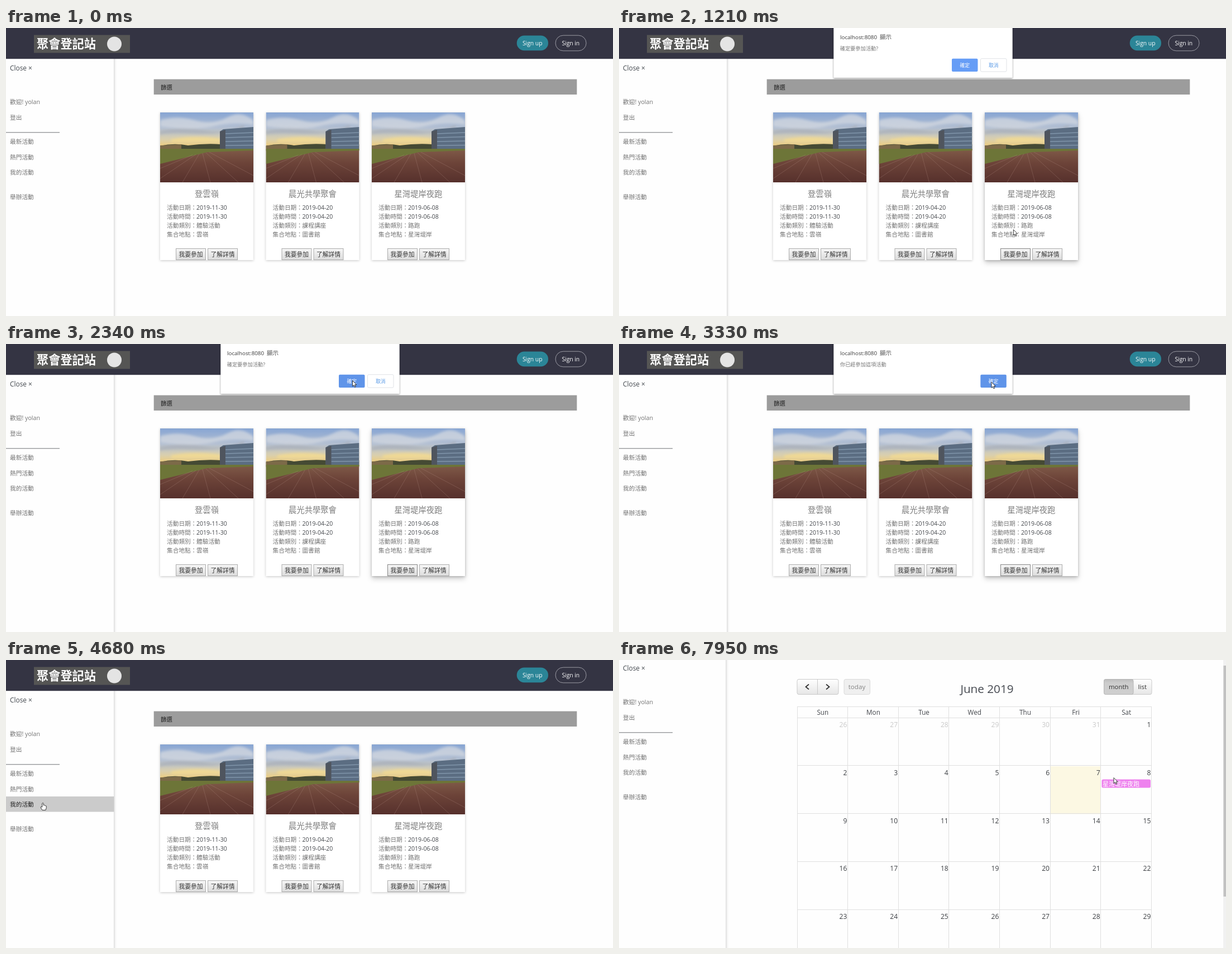
Recreate the animation shown at these times as an HTML page. Size 1087 by 515 pixels, loop 8 s.

```html
<!DOCTYPE html>
<html lang="zh-Hant">
<head>
<meta charset="utf-8">
<title>聚會登記站</title>
<style>
html, body { margin: 0; width: 100%; height: 100%; overflow: hidden; background: #fefefe; }
svg { display: block; width: 1087px; height: 515px; }
text { font-family: "Open Sans", "Noto Sans CJK TC", "Noto Sans CJK JP", "Noto Sans CJK", sans-serif; white-space: pre; }
.soft { filter: drop-shadow(0 1.5px 2px rgba(0,0,0,.22)); }
.deep { filter: drop-shadow(0 5px 5px rgba(0,0,0,.18)); }
.side { filter: drop-shadow(1px 1px 2px rgba(0,0,0,.2)); }
.pop { filter: drop-shadow(0 1px 1.5px rgba(0,0,0,.45)); }
</style>
</head>
<body>
<svg id="stage" viewBox="0 0 1087 515" xmlns="http://www.w3.org/2000/svg"></svg>
<script>
const LOOP = 8000, CALENDAR_AT = 6610, MENU_AT = 6660;

const rect = (x, y, w, h, fill, more = '') =>
  `<rect x="${x}" y="${y}" width="${w}" height="${h}" fill="${fill}" ${more}/>`;
const text = (x, y, s, size, fill, anchor = 'start', more = '') =>
  `<text x="${x}" y="${y}" font-size="${size}" fill="${fill}" text-anchor="${anchor}" ${more}>${s}</text>`;
const path = (d, fill, more = '') => `<path d="${d}" fill="${fill}" ${more}/>`;
const range = n => [...Array(n).keys()];
const gradient = (id, stops) =>
  `<linearGradient id="${id}" x2="0" y2="1">` +
  stops.map(([at, c]) => `<stop offset="${at}" stop-color="${c}"/>`).join('') + '</linearGradient>';

function photo() {
  const lanes = range(6).map(i => `M${88 - i * 6} ${71 + i}L${190 - i * 50} 125`).join('');
  const floors = range(4).map(i => `M117 ${38 + i * 7}L167 ${36 + i * 7.5}`).join('');
  return '<symbol id="photo" viewBox="0 0 167 125" width="167" height="125">' +
    rect(0, 0, 167, 70, 'url(#sky)') +
    '<g filter="url(#blur)" opacity=".75">' +
    path('M0 14Q30 5 62 14T120 9T167 15V22Q130 17 95 25T0 25Z', '#d3d8e0') +
    path('M0 33Q40 25 80 32T150 22V28Q110 40 60 38T0 40Z', '#a9afb9') +
    path('M20 48Q60 40 108 47V53H20Z', '#f6dc8e') + '</g>' +
    path('M0 60Q24 54 50 59Q80 55 110 57H167V68H0Z', '#454a34') +
    path('M0 59L38 57V65H0Z', '#7c6a48') +
    path('M107 34L113 30L167 26V67L107 65Z', '#5b6d82') +
    path(floors, 'none', 'stroke="#8095aa" stroke-width="1.6"') +
    path('M107 34L117 31V65H107Z', '#4f555e') +
    rect(0, 66, 167, 59, 'url(#track)') +
    path('M0 65H167V68L84 71L0 92Z', '#6d7538') +
    path(lanes, 'none', 'stroke="#b89488" stroke-width=".7" opacity=".4"') + '</symbol>';
}

function button(x, y, w, h, label) {
  return rect(x + .5, y + .5, w - 1, h - 1, 'url(#key)', 'stroke="#ababab"') +
    text(x + w / 2, y + 15, label, 10.8, '#333', 'middle');
}

function card(x, name, date, kind, place) {
  const rows = [['活動日期：', date], ['活動時間：', date], ['活動類別：', kind], ['集合地點：', place]];
  return rect(x, 151, 167, 264, '#fff', 'class="soft"') +
    `<use href="#photo" x="${x}" y="151"/>` +
    text(x + 83.5, 302, name, 14.3, '#7d7d7d', 'middle') +
    rows.map(([k, v], i) => text(x + 12, 325 + i * 16.1, k, 10.7, '#747474') +
      text(x + 65, 325 + i * 16.1, v, i < 2 ? 10.5 : 10.7, i < 2 ? '#45484d' : '#747474')).join('') +
    button(x + 28, 394, 54, 21, '我要參加') + button(x + 85, 394, 54, 21, '了解詳情');
}

function home() {
  return rect(264.7, 91.6, 757.6, 27.4, '#9c9c9c') + text(277, 109.5, '篩選', 10.4, '#222') +
    rect(655, 151, 167, 264, '#fff', 'class="deep" id="lift"') +
    card(276, '登雲嶺', '2019-11-30', '體驗活動', '雲嶺') +
    card(465.5, '晨光共學聚會', '2019-04-20', '課程講座', '圖書館') +
    card(655, '星灣堤岸夜跑', '2019-06-08', '路跑', '星灣堤岸') +
    rect(683.5, 394.5, 53, 20, 'none', 'stroke="#858585" id="focus"');
}

function header() {
  return rect(0, 0, 1087, 55.2, '#343443') + rect(50, 12.5, 172, 32, '#555554') +
    text(55, 36, '聚會登記站', 21.2, '#fff', 'start', 'font-weight="700"') +
    '<circle cx="194" cy="28.5" r="13" fill="#e4e4e4"/>' +
    rect(914.7, 13.6, 56.3, 26.6, '#2b8597', 'rx="13.3"') + text(942.7, 31, 'Sign up', 10.3, '#fff', 'middle') +
    rect(984, 13.2, 55, 27.6, 'none', 'rx="13.8" stroke="#a5a5ae" stroke-width=".9"') +
    text(1011.3, 31, 'Sign in', 10.3, '#fff', 'middle');
}

function menu() {
  const rows = [['歡迎! yolan', 136], ['登出', 164], ['最新活動', 207], ['熱門活動', 235], ['舉辦活動', 305.5]];
  return rect(-5, 50, 198, 540, '#fefefe', 'class="side" id="panel"') +
    rect(0, 244, 193.5, 27.5, '#cbcbcb', 'id="bar"') +
    text(7, 75.5, 'Close ×', 11.9, '#454a50') +
    rows.map(([s, y]) => text(7, y, s, 10.7, '#737373')).join('') +
    text(7, 262, '我的活動', 10.7, '#737373', 'start', 'id="mine"') +
    rect(0, 186.3, 96, 1, '#6f7276');
}

function calendar() {
  const left = 319.5, top = 103.5, w = 90.65, h = 85.9;
  const frame = 'stroke="#c9c9c9"', names = ['Sun', 'Mon', 'Tue', 'Wed', 'Thu', 'Fri', 'Sat'];
  const lines = range(8).map(i => `M${Math.round(left + i * w) - .5} 84V515`).join('') + 'M319 83.5H954' +
    range(5).map(i => `M319 ${Math.round(top + i * h) - .5}H954`).join('');
  const days = range(35).map(i => {
    const faded = i < 6, n = faded ? 26 + i : i - 5;
    return text(left + (i % 7 + 1) * w - 1.7, 119.7 + Math.floor(i / 7) * h, n, 12.1, faded ? '#c9c9c9' : '#3c3f43', 'end');
  }).join('');
  return rect(0, 0, 1087, 515, '#fefefe') +
    rect(319, 34.5, 74, 27, 'url(#tool)', `rx="3" ${frame}`) + path('M355.5 35V61', 'none', frame) +
    path('M340 43.5L334.5 48L340 52.5M371 43.5L376.5 48L371 52.5', 'none', 'stroke="#333" stroke-width="1.8"') +
    rect(403, 34.5, 46.5, 27, '#efefef', 'rx="3" stroke="#dadada"') + text(426, 52.3, 'today', 11.6, '#858585', 'middle') +
    text(659, 58.7, 'June 2019', 20.7, '#454950', 'middle') +
    rect(868.5, 34.5, 85.5, 27, 'url(#tool)', `rx="3" ${frame}`) +
    rect(868.5, 34.5, 52.5, 27, 'url(#down)', 'rx="3" stroke="#b5b5b5"') +
    text(894.7, 52.3, 'month', 11.4, '#333', 'middle') + text(937.3, 52.3, 'list', 11.6, '#333', 'middle') +
    rect(772.5, 190, 90.5, 85.5, '#fcf8e3') + path(lines, 'none', 'stroke="#dfdfdf"') +
    names.map((s, i) => text(left + (i + .5) * w, 98, s, 11.7, '#45484d', 'middle')).join('') + days +
    rect(864.5, 213.5, 87.5, 15, '#ee82ee', 'rx="2.5"') + text(866, 225.5, '星灣堤岸夜跑', 11, '#fff') +
    rect(1082, 0, 5, 515, '#f1f1f1') + rect(1082.5, 10, 4.5, 423, '#c1c1c1', 'id="thumb"');
}

function dialog(id, message, okX, cancel) {
  const key = (x, label, fill, ink, edge, name = '') =>
    rect(x, 54.7, 46.5, 23.3, fill, `rx="2" stroke="${edge}" ${name}`) + text(x + 23.3, 69.5, label, 8.8, ink, 'middle');
  return `<g id="${id}">` + rect(384.3, -6, 320.4, 95, '#fff', 'class="pop" rx="1"') +
    text(396, 20, 'localhost:8080', 9.8, '#3a3a3a') + text(467, 20, '顯示', 10.5, '#555') +
    text(396, 40, message, 9.2, '#777') +
    key(596, '', 'none', 'none', 'none') +
    key(okX, '確定', '#669df6', '#fff', 'none', `id="${id}Ok"`) +
    (cancel ? key(647.5, '取消', '#fff', '#5b9be6', '#dfe2e6') : '') + '</g>';
}

document.getElementById('stage').innerHTML = '<defs>' +
  '<filter id="blur"><feGaussianBlur stdDeviation="2"/></filter>' +
  gradient('sky', [[0, '#87a5d3'], [.4, '#b4c0d2'], [.68, '#d9cfae'], [.85, '#eccd82']]) +
  gradient('track', [[0, '#7f5a48'], [.4, '#6d4439'], [1, '#56302c']]) +
  gradient('key', [[0, '#f7f7f7'], [1, '#dcdcdc']]) +
  gradient('tool', [[0, '#fff'], [1, '#e6e6e6']]) +
  gradient('down', [[0, '#bdbdbd'], [.25, '#cccccc'], [1, '#cfcfcf']]) + photo() + '</defs>' +
  rect(0, 0, 1087, 515, '#fefefe') +
  `<g id="home">${home()}</g><g id="month">${calendar()}</g><g id="menu">${menu()}</g><g id="head">${header()}</g>` +
  dialog('ask', '確定要參加活動?', 596, true) + dialog('done', '你已經參加這項活動', 647.3, false) +
  '<g id="cursor"><g id="arrow">' +
  path('M0 0V10.3L2.4 8.1L4 11.8L5.7 11.1L4.1 7.4H7.3Z', '#fff', 'stroke="#222" stroke-width=".9"') +
  '</g><g id="hand">' +
  path('M-1.2 8V1.4Q0 -.5 1.2 1.4V4.8Q2.5 3.8 3.2 5.2Q4.4 4.5 4.9 5.7Q6 5.4 6.2 6.7V9.6L4.9 13.4H-1L-3.9 8.8Q-4.2 6.4-1.2 8Z',
    '#fff', 'stroke="#222" stroke-width=".9"') + '</g></g>';

const part = {};
document.querySelectorAll('[id]').forEach(e => part[e.id] = e);

// Rows: time, then values, blended linearly.
const route = [
  [240, 922, 499], [500, 812, 440], [750, 716, 402], [1100, 716, 402], [1400, 690, 290], [1650, 615, 105],
  [1820, 585, 48], [1890, 588, 51], [2150, 617, 64], [2420, 622, 66], [2710, 627, 64], [2900, 643, 73],
  [3150, 671, 71], [3330, 667, 68], [3620, 667, 68], [3900, 470, 170], [4180, 215, 250], [4320, 109, 255],
  [4680, 66, 255], [7030, 66, 255], [7250, 330, 292], [7450, 720, 305], [7600, 970, 275], [7700, 1001, 235],
  [7820, 926, 192], [7950, 886, 210.5]
];
const lift = [[600, 0], [880, 1], [3650, 1], [3950, 0]];
const askFade = [[1099, 0], [1100, .52], [1210, 1], [2430, 1], [2540, 0]];
const doneFade = [[2560, 0], [2680, 1], [3590, 1], [3710, 0]];

function at(rows, t) {
  const i = rows.findIndex(r => r[0] > t);
  if (i === 0) return rows[0].slice(1);
  if (i < 0) return rows[rows.length - 1].slice(1);
  const a = rows[i - 1], b = rows[i], k = (t - a[0]) / (b[0] - a[0]);
  return a.slice(1).map((v, j) => v + (b[j + 1] - v) * k);
}

const show = (e, on) => e.style.display = on ? '' : 'none';

function setDialog(e, o) {
  show(e, o > 0);
  e.setAttribute('opacity', o);
  const wide = 1 + (1 - o) * .012;
  e.setAttribute('transform', `translate(${544.5 * (1 - wide)} ${-16 * (1 - o)}) scale(${wide} 1)`);
}

function draw(t) {
  const [x, y] = at(route, t), late = t >= CALENDAR_AT;
  const hover = !late && x < 193 && y > 244 && y < 271;
  show(part.home, !late);
  show(part.head, !late);
  show(part.month, late);
  show(part.menu, !late || t >= MENU_AT);
  part.menu.setAttribute('transform', `translate(0 ${late ? -57 : 0})`);
  part.panel.setAttribute('width', late ? 196 : 198);
  part.thumb.setAttribute('height', t < MENU_AT ? 423 : 413);
  show(part.bar, hover);
  part.mine.setAttribute('fill', hover ? '#222' : '#737373');
  part.lift.setAttribute('opacity', at(lift, t)[0]);
  show(part.focus, t >= 900 && t < 3700);
  part.focus.setAttribute('fill', t >= 900 && t < 960 ? 'rgba(0,0,0,.1)' : 'none');
  setDialog(part.ask, at(askFade, t)[0]);
  setDialog(part.done, at(doneFade, t)[0]);
  part.askOk.setAttribute('fill', t > 1900 && x > 596 && y > 55 ? '#5f94e9' : '#669df6');
  part.doneOk.setAttribute('fill', x > 647 ? '#5f94e9' : '#669df6');
  const pointing = hover || (t > 4320 && t < 7070);
  show(part.cursor, t >= 240);
  show(part.hand, pointing);
  show(part.arrow, !pointing);
  part.cursor.setAttribute('transform', `translate(${x} ${y})`);
}

const start = performance.now();
function tick() {
  draw((performance.now() - start) % LOOP);
  requestAnimationFrame(tick);
}
tick();
</script>
</body>
</html>
```
